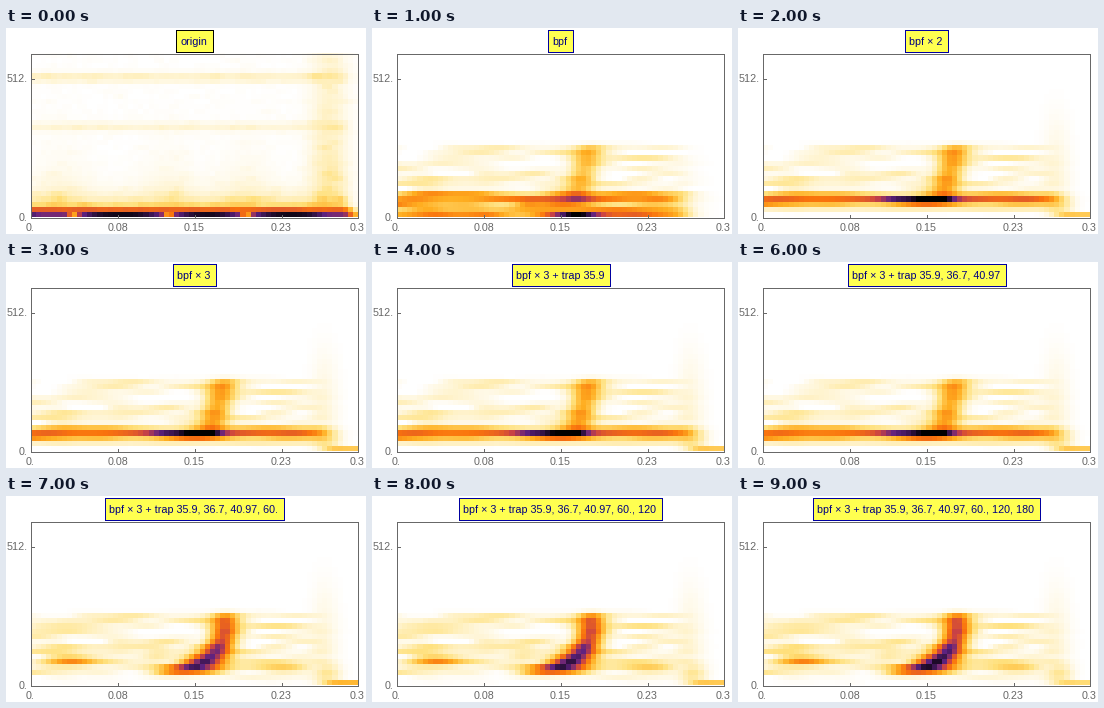
Recreate the animation shown at these times as a matplotlib script. Size 360 px wide and 206 px high, loop 10 s.

```python
import numpy as np
import matplotlib.pyplot as plt
from matplotlib.animation import FuncAnimation
from matplotlib.colors import LinearSegmentedColormap
from matplotlib.patches import Rectangle

W, H, DPI = 360, 206, 100
LEFT, RIGHT, TOP, BOTTOM = 24.5, 351.5, 25.5, 189.5
COLS, ROWS = 64, 32
FONT = dict(family="Liberation Sans", size=10.8 * 72 / DPI)
GRAY = "#686868"

TRAPS = ["35.9", "36.7", "40.97", "60.", "120", "180"]
TITLES = ["origin", "bpf", "bpf × 2", "bpf × 3"] + [
    "bpf × 3 + trap " + ", ".join(TRAPS[:n]) for n in range(1, 7)]

sunset = LinearSegmentedColormap.from_list("sunset", [
    (1, 1, 1), (1, .882, .491), (1, .683, .13), (.979, .451, .051),
    (.788, .26, .271), (.373, .136, .503), (0, 0, 0)], N=512)

# Cell centres in stage pixels
cx = LEFT + (RIGHT - LEFT) * (np.arange(COLS) + .5) / COLS
cy = TOP + (BOTTOM - TOP) * (np.arange(ROWS) + .5) / ROWS
X, Y = np.meshgrid(cx, cy)


def step(d, soft):
    return 1 / (1 + np.exp(-np.clip(d / soft, -50, 50)))


def bell(d, w):
    return np.exp(-(d / w) ** 2)


def blob(x, y, w, h, amp):
    return amp * bell(X - x, w) * bell(Y - y, h)


def streaks(seed, span):
    """Unit noise, smoothed along time."""
    rng = np.random.default_rng(seed)
    kernel = np.hanning(span + 2)
    raw = rng.normal(size=(ROWS, COLS + span + 1))
    out = np.array([np.convolve(r, kernel, "valid") for r in raw])
    return out / out.std()


GRAIN = streaks(3, 3)
WAVES = streaks(11, 13)
LOW = step(Y - 119, 1.5)
FADE = step(312 - X, 7)


def row(n):
    """Mask of the n-th row from the bottom."""
    return np.arange(ROWS)[:, None] == ROWS - 1 - n


def raw_field():
    d = BOTTOM - Y
    end = step(340 - X, 3)
    lines = .075 * bell(Y - 50, 4.5) + .05 * bell(Y - 99, 4.5)
    humps = sum(bell(X - x, 26) for x in (55, 162, 240))
    haze = bell(X - 322, 18) * (.05 + .08 * (Y / BOTTOM) ** 2)
    floor = .22 * np.exp(-(d - 10) / 8) + .11 * humps * np.exp(-d / 28)
    v = (lines + floor) * end + haze
    v = v * (1 + .12 * GRAIN) + .004 * np.abs(GRAIN)
    wide = sum(bell(X - x, 20) for x in (40, 67, 162, 240, 328))
    spot = sum(bell(X - x, 5) for x in (67, 162, 240))
    base = .97 - .17 * np.minimum(wide, 1) - .45 * spot
    tail = step(344 - X, 3)
    v = np.where(row(1), (.52 + .015 * GRAIN) * tail + .03, v)
    return np.where(row(0), base * tail + .2 * (1 - tail), v)


def murmur(amp):
    level = np.clip(.75 + .6 * WAVES, 0, 2.2)
    return amp * level * LOW * FADE


def plume(amp, w):
    mid = 204 + (170 - Y) * .27
    return amp * bell(X - mid, w) * LOW * step(172 - Y, 2)


def tail_end(amp):
    corner = amp * row(0) * step(X - 322, 4)
    veil = .035 * bell(X - 318, 13) * step(Y - 95, 12)
    return corner + veil + blob(322, 178, 12, 9, .1)


def first_pass():
    v = murmur(.065) * step(172 - Y, 3) + plume(.25, 14)
    ripple = .07 * WAVES
    v += row(4) * (.17 + ripple) * FADE
    v += row(3) * (.38 + ripple) * FADE
    v += row(2) * (.24 + ripple) * FADE
    v += row(1) * (.3 + ripple) * FADE
    v += row(0) * (.42 + ripple) * FADE
    v += blob(185, 171, 30, 4, .36) + blob(155, 176, 14, 3, .2)
    return v + blob(207, 186, 30, 3, .65)


def steady(n):
    """Band kept near 70 Hz, slowly weakened by each added filter."""
    v = murmur(.065) * step(178 - Y, 3) + plume(.33, 14)
    core = step(318 - X, 5)
    v += row(3) * (.5 - .008 * n + .02 * WAVES) * core
    v += (row(4) * .13 + row(2) * .23) * (1 + .15 * WAVES) * core
    v += row(1) * .07 * core
    v += row(3) * (.52 * bell(X - 187, 26) + .2 * bell(X - 155, 18))
    v += blob(178, 176, 32, 3, .14)
    return v + tail_end(.24)


def chirp(n):
    """Rising sweep left once the hum is removed."""
    v = murmur(.075 + .004 * n) * step(180 - Y, 3)
    u = np.clip((Y - 120) / 53, 0, 1)
    mid = 219 - 31 * u ** 3
    amp = .42 + .46 * u + .03 * n
    v += amp * bell(X - mid, 13 + 12 * u ** 4) * LOW * step(176 - Y, 1)
    v += blob(165, 175, 20, 4, .32) + blob(66, 166, 24, 5, .3)
    v += blob(272, 172, 26, 4, .17) + blob(45, 131, 30, 7, .1)
    v += blob(150, 160, 14, 8, .1)
    return v + tail_end(.3 - .06 * n)


def field(i):
    if i == 0:
        v = raw_field()
    elif i == 1:
        v = first_pass()
    elif i < 7:
        v = steady(i - 2)
    else:
        v = chirp(i - 7)
    return np.clip(v, 0, 1)


FIELDS = [field(i) for i in range(len(TITLES))]

fig = plt.figure(figsize=(W / DPI, H / DPI), dpi=DPI, facecolor="white")
ax = fig.add_axes([0, 0, 1, 1])
ax.axis("off")
image = ax.imshow(FIELDS[0], cmap=sunset, vmin=0, vmax=1, aspect="auto",
                  interpolation="nearest", extent=(LEFT, RIGHT, BOTTOM, TOP))
ax.set_xlim(0, W)
ax.set_ylim(H, 0)


def line(xs, ys):
    ax.plot(xs, ys, color=GRAY, lw=.72, antialiased=False, zorder=3)


ax.add_patch(Rectangle((LEFT, TOP), RIGHT - LEFT, BOTTOM - TOP, fill=False,
                       ec=GRAY, lw=.72, antialiased=False, zorder=3))
for x, label in [(24.5, "0."), (111.5, "0.08"), (188.5, "0.15"),
                 (275.5, "0.23"), (351.5, "0.3")]:
    line([x, x], [BOTTOM, BOTTOM - 3])
    ax.text(x, 203, label, ha="center", va="baseline", color=GRAY, **FONT)
for y, label in [(50.5, "512."), (189.5, "0.")]:
    line([LEFT, LEFT + 3], [y, y])
    ax.text(21.5, y + 3.5, label, ha="right", va="baseline", color=GRAY, **FONT)

box = ax.add_patch(Rectangle((0, 1.5), 1, 22, fc="#ffff50", lw=.72,
                             antialiased=False, zorder=4))
title = ax.text(187.8, 16.5, "", ha="center", va="baseline",
                color="#000080", zorder=5, **FONT)


def draw(i):
    image.set_data(FIELDS[i])
    title.set_text(TITLES[i])
    width = round(title.get_window_extent().width) + 10
    box.set_x(round(187.8 - width / 2) + .5)
    box.set_width(width)
    box.set_edgecolor("black" if i == 0 else "#0000a0")
    return image, box, title


anim = FuncAnimation(fig, draw, frames=len(TITLES), interval=1000,
                     repeat=True, repeat_delay=0, blit=False)
plt.show()
```
